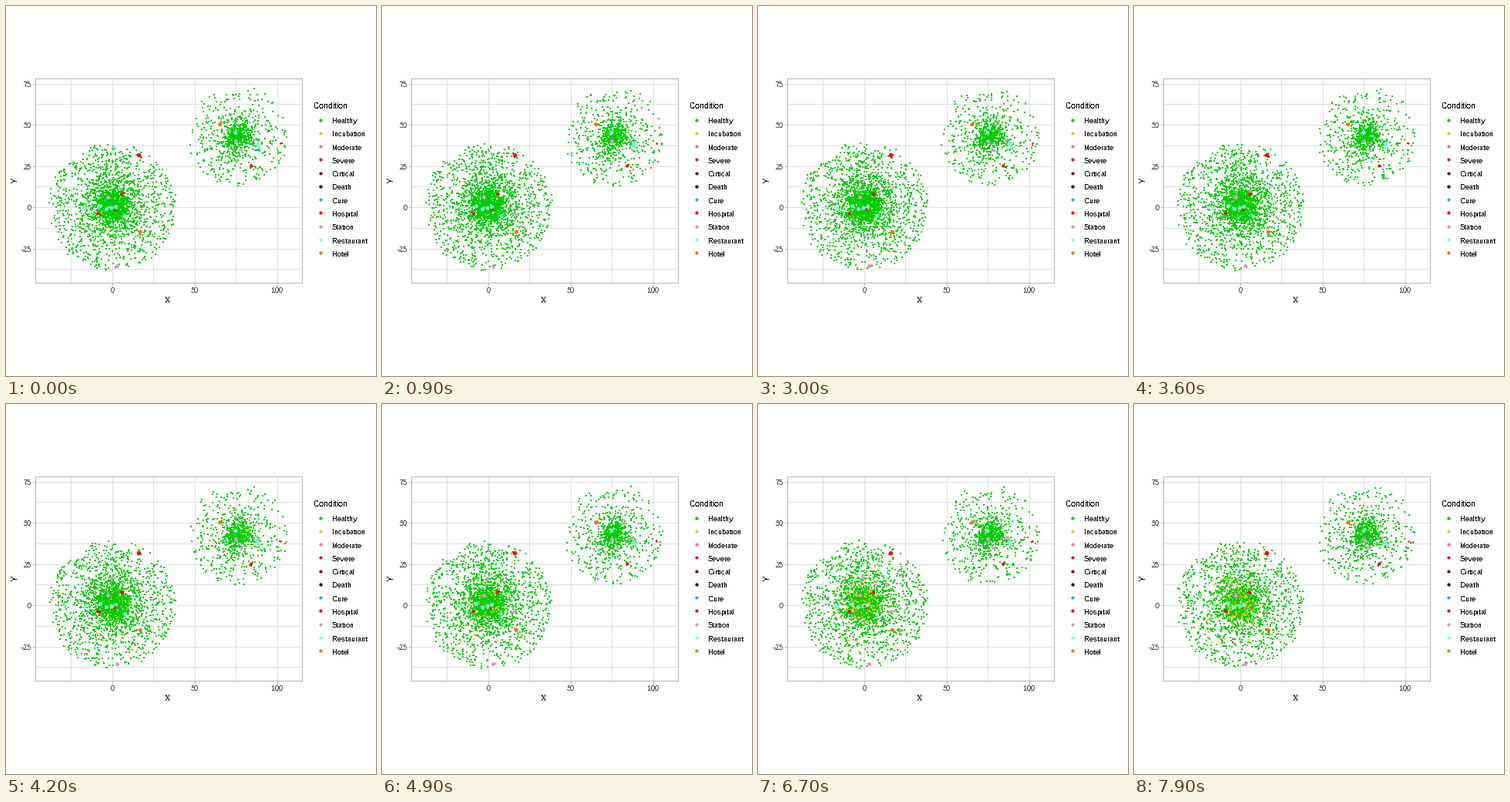
These frames come from a looping animation (480x480 px, 8000 ms). A matplotlib script:

```python
import numpy as np
import matplotlib.pyplot as plt
from matplotlib.animation import FuncAnimation

plt.rcParams.update({
    "font.family": "Liberation Sans",
    "text.hinting": "native",
    "text.hinting_factor": 1,
    "text.antialiased": False,
})

SIZE, DPI = 480, 72
FRAMES, STEP = 80, 100
X0, Y0, UNIT = 137.7, 261.2, 2.141
LEFT, RIGHT, TOP, BOTTOM = 37.5, 383.5, 93.5, 358.5

COLORS = {
    "Healthy": "#00CD00", "Incubation": "#FFC125", "Moderate": "#FF69B4",
    "Severe": "#DC143C", "Cirtical": "#8B0000", "Death": "#000000",
    "Cure": "#00BFFF", "Hospital": "#FF0000", "Station": "#DA96DA",
    "Restaurant": "#7FFFD4", "Hotel": "#FF6A00",
}

# Buildings: x, y and diameter in pixels
SITES = {
    "Station": [(144.5, 337.5, 5), (132.5, 248.5, 5), (136.5, 226.5, 4), (172, 269.5, 4),
                (298.5, 175.5, 5), (305.5, 187, 4), (322, 174, 4)],
    "Hospital": [(172.5, 193.7, 5.5), (150.2, 244.3, 4.2), (119.2, 269.3, 4.2),
                 (318.3, 207.5, 4.2), (141, 265, 2.5), (356.5, 178.5, 2.5)],
    "Restaurant": [(102.5, 262.5, 5), (122.5, 259.5, 5), (130.5, 263.5, 5), (137, 262, 5),
                   (142.5, 260.5, 5), (154.5, 272.5, 5), (298, 164.5, 5),
                   (326.5, 179, 5.5), (328.5, 183, 4)],
    "Hotel": [(277.7, 153.7, 5), (174.2, 293.3, 5)],
}


def px(x):
    return X0 + UNIT * np.asarray(x)


def py(y):
    return Y0 - UNIT * np.asarray(y)


def town(cx, cy, rings):
    """Residents around a centre; each ring is (count, radius)."""
    r = np.concatenate([rng.uniform(0, rad, n) for n, rad in rings])
    a = rng.uniform(0, 2 * np.pi, r.size)
    return np.column_stack([cx + r * np.cos(a), cy + r * np.sin(a)])


rng = np.random.default_rng(7)
big = town(0, 0.5, [(1600, 38.5), (450, 20), (600, 10)])
small = town(76.3, 42.7, [(540, 30), (160, 15), (200, 8)])
homes = np.vstack([big, small])
count = len(homes)

# Infection order: a race weighted towards the core and one southern district
dist = np.hypot(homes[:, 0], homes[:, 1])
south = np.hypot(homes[:, 0] + 5, homes[:, 1] + 24)
rate = np.maximum(np.exp(-dist / 8), 0.3 * np.exp(-south ** 2 / 60))
rate[len(big):] = 0.0015
rank = np.argsort(np.argsort(rng.exponential(1, count) / rate)) + 1
caught = np.interp(rank, [1, 3, 18, 80, 250, 380, 540],
                   [11, 18, 30, 42, 56, 67, 79], right=999)
moderate = caught + rng.uniform(22, 70, count)
severe = moderate + rng.uniform(12, 60, count)

order = rng.permutation(count)
homes, caught, moderate, severe = (v[order] for v in (homes, caught, moderate, severe))
palette = np.array([plt.matplotlib.colors.to_rgba(COLORS[k])
                    for k in ("Healthy", "Incubation", "Moderate", "Severe")])

fig = plt.figure(figsize=(SIZE / DPI, SIZE / DPI), dpi=DPI, facecolor="white")
ax = fig.add_axes([0, 0, 1, 1])
ax.set(xlim=(0, SIZE), ylim=(SIZE, 0))
ax.axis("off")


def line(xs, ys, color, z=1):
    ax.plot(xs, ys, color=color, lw=1, zorder=z, antialiased=False)


def label(x, y, s, size=9, color="black", **kw):
    ax.text(x, y, s, fontsize=size, color=color, va="baseline", **kw)


for v in range(-25, 101, 25):
    x = px(v)
    line([x, x], [TOP, BOTTOM], "#DEDEDE")
    if v % 50 == 0:
        line([x, x], [BOTTOM, BOTTOM + 3], "#B3B3B3", 5)
        label(x, 372, str(v), color="#4D4D4D", ha="center")
for v in np.arange(-37.5, 76, 12.5):
    y = py(v)
    line([LEFT, RIGHT], [y, y], "#DEDEDE")
    if v % 25 == 0:
        line([LEFT - 3, LEFT], [y, y], "#B3B3B3", 5)
        label(32.5, y + 4, f"{v:.0f}", color="#4D4D4D", ha="right")
line([LEFT, RIGHT, RIGHT, LEFT, LEFT], [TOP, TOP, BOTTOM, BOTTOM, TOP], "#B3B3B3", 5)

label(209.5, 385, "X", 11, ha="center")
ax.text(11.5, 226, "Y", fontsize=11, rotation=90, ha="center", va="center")
label(400, 133, "Condition", 11)
for i, (name, color) in enumerate(COLORS.items()):
    y = 147.5 + 17.28 * i
    ax.scatter([408], [y], s=4.2 ** 2, c=color, linewidths=0)
    label(423, round(y + 4.5), name)

people = ax.scatter(px(homes[:, 0]), py(homes[:, 1]), s=4, marker="s",
                    linewidths=0, antialiased=False, zorder=3)

sites = [(x, y, d, COLORS[k]) for k, group in SITES.items() for x, y, d in group]
sx, sy, sd, sc = zip(*sites)
ax.scatter(sx, sy, s=np.square(sd), c=sc, linewidths=0, zorder=4)

# One visitor per building, wandering close to it
spots = np.column_stack([sx, sy])
guests = ax.scatter(sx, sy, s=4, marker="s", c=sc, linewidths=0,
                    antialiased=False, zorder=4)


def update(i):
    step = np.random.default_rng(100 + i)
    pos = homes + step.uniform(-1, 1, homes.shape)
    people.set_offsets(np.round(np.column_stack([px(pos[:, 0]), py(pos[:, 1])])))
    stage = (i >= caught).astype(int) + (i >= moderate) + (i >= severe)
    people.set_facecolors(palette[stage])
    guests.set_offsets(np.round(spots + step.uniform(-3, 3, spots.shape)))
    return people, guests


anim = FuncAnimation(fig, update, frames=FRAMES, interval=STEP,
                     repeat=True, repeat_delay=0, blit=False)
plt.show()
```
